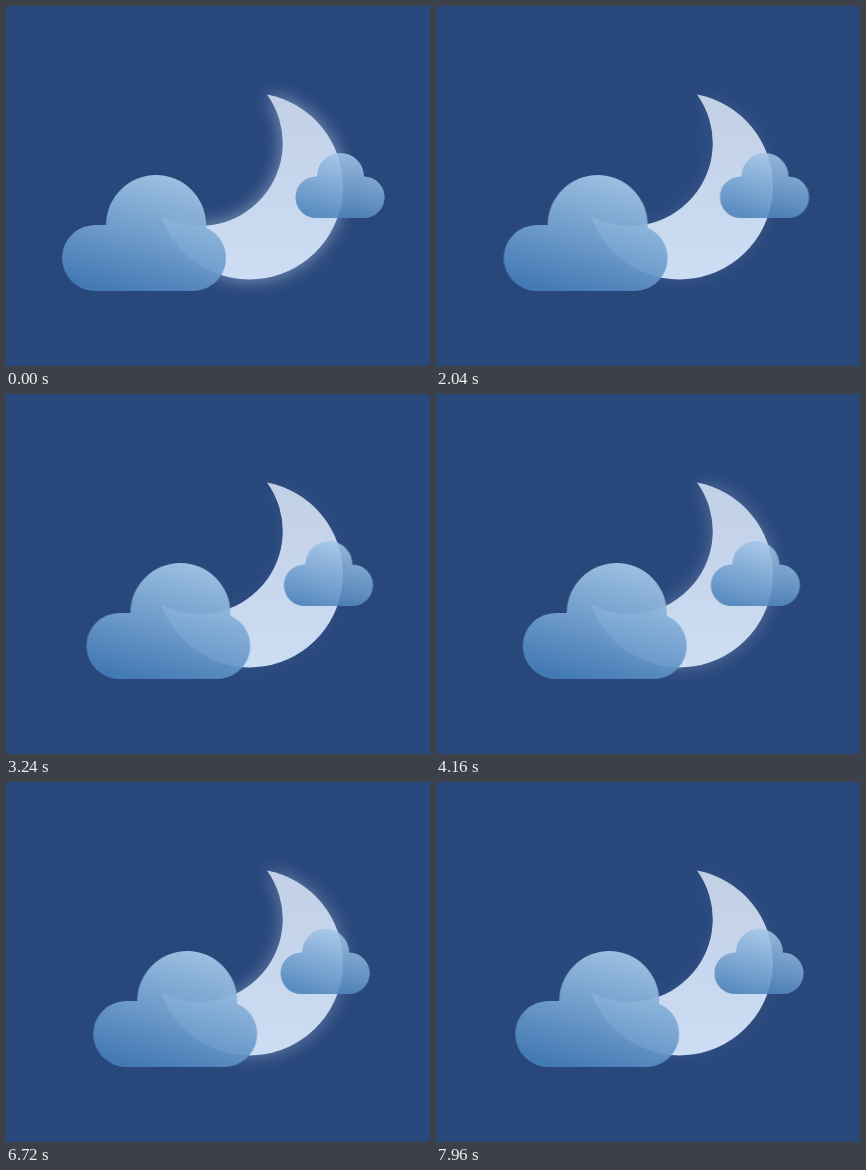
An HTML page for the animation above (8 s loop, 424 by 360 pixels).

```html
<!DOCTYPE html>
<html lang="en">
<head>
<meta charset="utf-8">
<title>Cloudy night</title>
<style>
  html, body { margin: 0; width: 100%; height: 100%; overflow: hidden; background: #28477b; }
  svg { display: block; width: 100%; height: 100%; }
</style>
</head>
<body>
<svg viewBox="0 0 424 360">
  <defs>
    <linearGradient id="moonFill" x1="0" y1="0" x2="0" y2="1">
      <stop offset="0" stop-color="#c2d0e6"/>
      <stop offset="1" stop-color="#ccddf4"/>
    </linearGradient>
    <linearGradient id="cloudFill" x1=".68" y1="0" x2=".3" y2="1">
      <stop offset="0" stop-color="#a8caea"/>
      <stop offset="1" stop-color="#477eb8"/>
    </linearGradient>
    <filter id="blur" x="-30%" y="-30%" width="160%" height="160%" color-interpolation-filters="sRGB">
      <feGaussianBlur stdDeviation="9"/>
    </filter>
    <path id="crescent" d="M261 88.5A93.3 93.3 0 1 1 155.3 210.3A82.8 82.8 0 0 0 261 88.5Z"/>
  </defs>
  <g id="glow"><use href="#crescent" fill="#c8d8f0" filter="url(#blur)"/></g>
  <use href="#crescent" fill="url(#moonFill)"/>
  <path id="big" fill="url(#cloudFill)" opacity=".93"
    d="M89 219H100A50 50 0 0 1 200 219V221.7A33 33 0 0 1 187 285H89A33 33 0 0 1 89 219Z"/>
  <path id="small" fill="url(#cloudFill)" opacity=".86"
    d="M310.2 170.5H311A23.5 23.5 0 0 1 358 170.5A20.75 20.75 0 0 1 357.8 212H310.2A20.75 20.75 0 0 1 310.2 170.5Z"/>
</svg>
<script>
  const LOOP = 8000;
  const get = id => document.getElementById(id);

  // steps: [time in ms, style]; lead: how far the motion has run at loop start
  function track(id, lead, steps) {
    const end = steps[steps.length - 1][0];
    const frames = steps.map(([ms, style]) => ({ ...style, offset: ms / end, easing: 'ease-in-out' }));
    const anim = get(id).animate(frames, { duration: end, fill: 'both' });
    anim.pause();
    return t => { anim.currentTime = t + lead; };
  }

  const shift = x => ({ transform: `translateX(${x}px)` });
  const drift = (id, dx) => track(id, 60, [
    [0, shift(0)], [5050, shift(dx)], [6020, shift(dx)], [11420, shift(0)]
  ]);

  const bright = { opacity: 0.6 }, dim = { opacity: 0.05 };
  const tracks = [
    drift('big', 32.5),
    drift('small', -15.5),
    track('glow', 40, [[0, bright], [2820, dim], [5640, bright], [8460, dim]])
  ];

  function draw(now) {
    const t = now % LOOP;
    tracks.forEach(seek => seek(t));
    requestAnimationFrame(draw);
  }
  draw(0);
</script>
</body>
</html>
```
